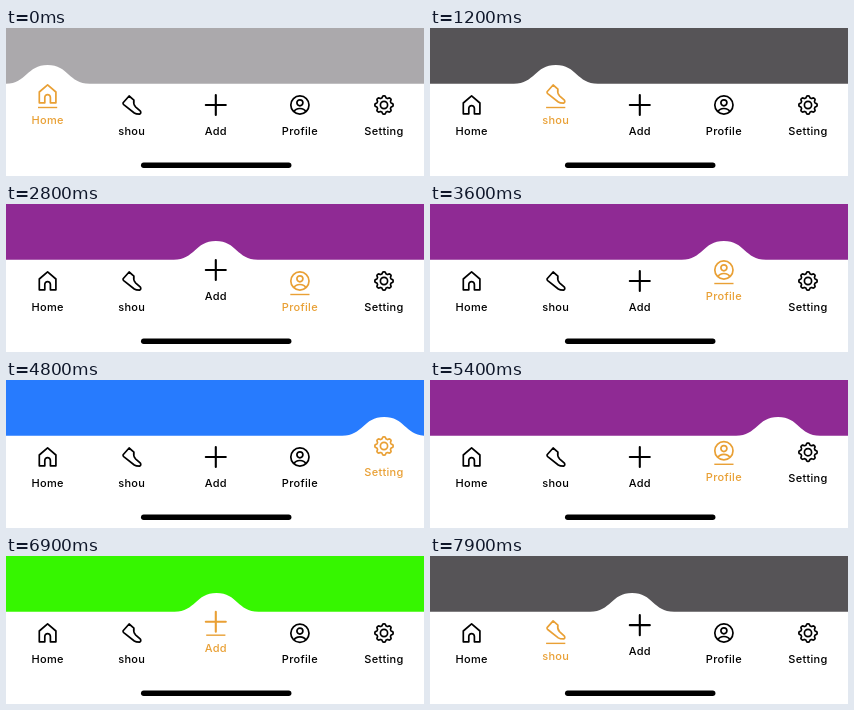
Write an HTML page that moves like this. It is 418 px wide and 148 px high and loops after 8000 ms.

```html
<!DOCTYPE html>
<html>
<head>
<meta charset="utf-8">
<style>
html, body { margin: 0; width: 100%; height: 100%; overflow: hidden; background: #fff; }
svg { display: block; width: 418px; height: 148px; }
text { font: 500 11px Inter, Roboto, sans-serif; letter-spacing: .3px; text-anchor: middle; fill: currentColor; }
.icon { fill: none; stroke: currentColor; stroke-width: 1.7; stroke-linejoin: round; stroke-linecap: round; }
.line { fill: currentColor; }
</style>
</head>
<body>
<svg viewBox="0 0 418 148">
  <rect id="back" width="418" height="70"/>
  <path id="bar" fill="#fff"/>
  <g id="tabs"></g>
  <rect x="135" y="134.5" width="150.4" height="5.4" rx="2.7"/>
</svg>
<script>
const $ = id => document.getElementById(id);
const LOOP = 8000, ORANGE = '#e9a035', LIFT = 11;
const centre = i => 41.6 + 84.1 * i;

function gearPath() {
  let d = '';
  for (let i = 0; i < 96; i++) {
    const a = i / 96 * 2 * Math.PI;
    const r = 8.2 + .95 * Math.tanh(2 * Math.cos(8 * a));
    d += (i ? 'L' : 'M') + (r * Math.cos(a)).toFixed(2) + ' ' + (r * Math.sin(a)).toFixed(2);
  }
  return d + 'Z';
}
const circle = (x, y, r) => `M${x - r} ${y}a${r} ${r} 0 1 0 ${2 * r} 0a${r} ${r} 0 1 0 ${-2 * r} 0`;

const tabs = [
  { name: 'Home', back: '#aba9ac', icon: 'M-8.3-2L0-9.2L8.3-2V8.8H2.8V3.4a2.8 2.8 0 0 0-5.6 0V8.8H-8.3Z' },
  { name: 'shou', back: '#565457', icon: 'M-2.6-9L-8.6-2.2Q-8.9-1.2-8-.4L2.6 8Q4.2 9.1 7.8 9.1Q9.8 8.4 8.7 6.2L3.8 1.8Q1.4-1 2.2-4.8Z' },
  { name: 'Add', back: '#36f600', icon: 'M-10 0H10M0-10V10', weight: 2.1 },
  { name: 'Profile', back: '#8f2a94', icon: circle(0, 0, 9.1) + circle(0, -2.2, 3) + 'M-5.8 6.6Q-4.5 3.5 0 3.5T5.8 6.6' },
  { name: 'Setting', back: '#277bfe', icon: gearPath() + circle(0, 0, 3.6) }
];
const taps = [[-2000, 0], [450, 1], [1300, 2], [2800, 3], [4050, 4], [5250, 3], [6550, 2], [7810, 1]];

$('tabs').innerHTML = tabs.map((tab, i) => `<g>
  <path class="icon" transform="translate(${centre(i)} 77)" d="${tab.icon}" style="stroke-width:${tab.weight || 1.7}"/>
  <rect class="line" x="${centre(i) - 9.6}" y="89.8" width="19.2" height="1.4"/>
  <text x="${centre(i)}" y="107">${tab.name}</text></g>`).join('');
const groups = [...$('tabs').children];

// Underdamped spring from 0 to 1, t in ms
function spring(t) {
  if (t <= 0) return 0;
  const w = 2 * Math.PI / .6, z = .7, q = Math.sqrt(1 - z * z), s = t / 1000;
  return 1 - Math.exp(-z * w * s) * (Math.cos(w * q * s) + z / q * Math.sin(w * q * s));
}

function draw(now) {
  const t = now % LOOP;
  const n = taps.findLastIndex(tap => tap[0] <= t);
  const [start, active] = taps[n], before = n ? taps[n - 1][1] : active;
  const rise = spring(t - start), slide = spring(t - start - 45);
  const x = centre(before + (active - before) * slide);

  $('back').setAttribute('fill', tabs[active].back);
  $('bar').setAttribute('d', `M-100 55.8H${x - 42}C${x - 21} 55.8 ${x - 21} 37 ${x} 37S${x + 21} 55.8 ${x + 42} 55.8H520V148H-100Z`);
  groups.forEach((g, i) => {
    const up = i === active ? (n ? rise : 1) : i === before ? 1 - rise : 0;
    g.setAttribute('transform', `translate(0 ${-LIFT * up})`);
    g.style.color = i === active ? ORANGE : '#000';
    g.children[1].style.display = i === active && i < 4 ? '' : 'none';
  });
}

const begin = performance.now();
function tick() {
  draw(performance.now() - begin);
  requestAnimationFrame(tick);
}
tick();
</script>
</body>
</html>
```
